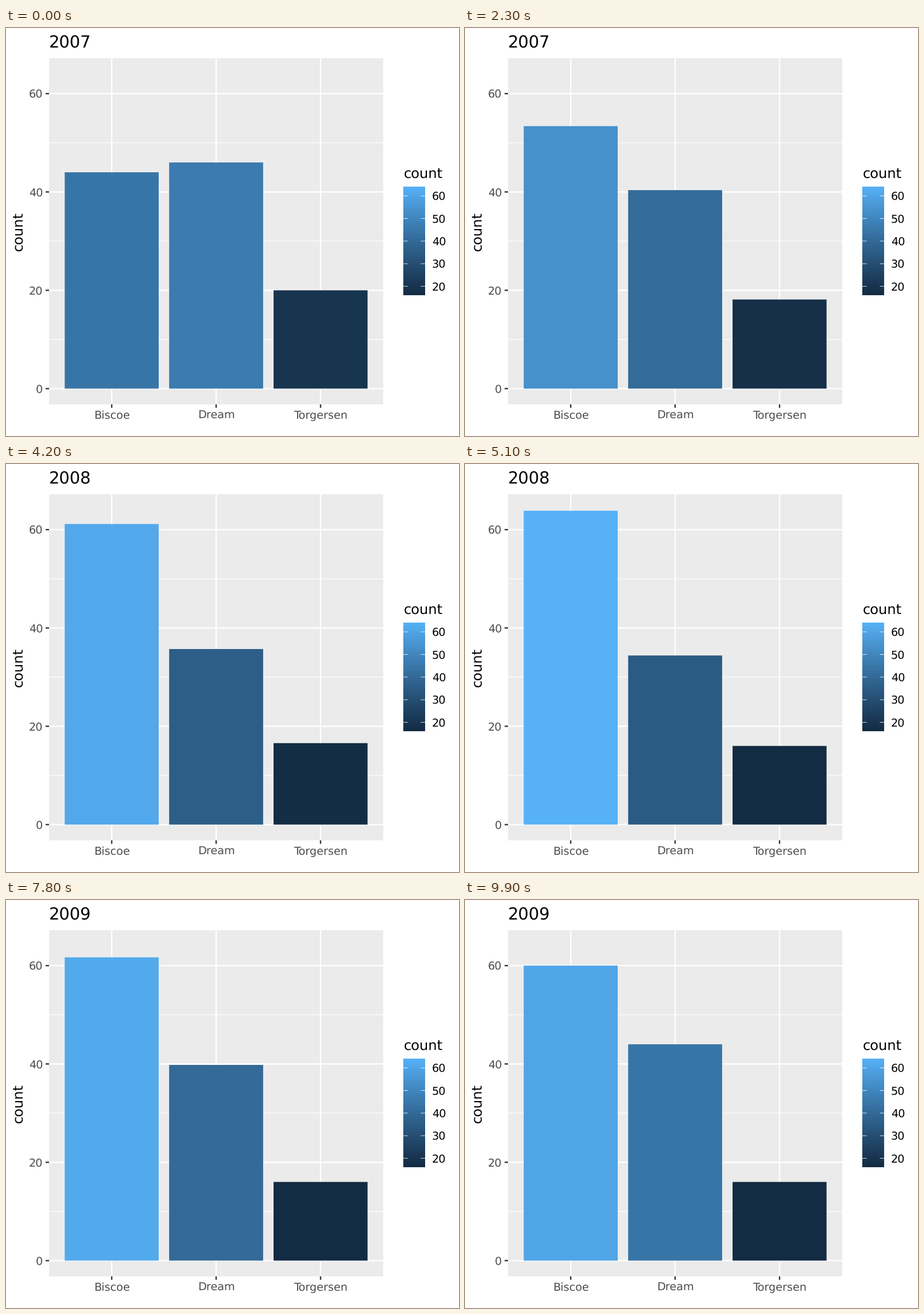
Animation of 789x710 px, one loop 10000 ms. Source, as a matplotlib script:

```python
import numpy as np
import matplotlib.pyplot as plt
from matplotlib.animation import FuncAnimation
from matplotlib.patches import Rectangle

W, H, DPI = 789, 710, 64
PT = 72 / DPI  # points per pixel
FRAMES, INTERVAL = 100, 100

plt.rcParams.update({
    "font.family": "DejaVu Sans",
    "text.hinting": "no_hinting",
    "path.snap": False,
})

ISLANDS = ["Biscoe", "Dream", "Torgersen"]
YEARS = [2007, 2008, 2009]
COUNTS = np.array([[44, 46, 20], [64, 34, 16], [60, 44, 16]])
KEYS = [0, 49, 99]  # animation steps at which each year is reached
LOW, HIGH = 16, 64

# Panel geometry in pixels
LEFT, RIGHT, TOP, BOTTOM = 75.0, 657.0, 52.6, 654.9
X_UNIT = (RIGHT - LEFT) / 3.2
Y_UNIT = (BOTTOM - TOP) / 70.4
ZERO = BOTTOM - 3.2 * Y_UNIT
BAR_W = 0.9 * X_UNIT
MAJOR, MINOR, TICK = 2.33, 1.17, 6.0
SMALL, MEDIUM, LARGE = 19.25, 24.1, 28.9

# Colour bar geometry
BAR_L, BAR_R, BAR_T, BAR_B = 692.2, 730.0, 276.3, 465.3

TO_XYZ = np.array([[0.4124564, 0.3575761, 0.1804375],
                   [0.2126729, 0.7151522, 0.0721750],
                   [0.0193339, 0.1191920, 0.9503041]])
WHITE = TO_XYZ.sum(axis=1)


def rgb_to_lab(rgb):
    rgb = np.asarray(rgb) / 255
    lin = np.where(rgb > 0.04045, ((rgb + 0.055) / 1.055) ** 2.4, rgb / 12.92)
    t = TO_XYZ @ lin / WHITE
    x, y, z = np.where(t > 216 / 24389, np.cbrt(t), (24389 / 27 * t + 16) / 116)
    return np.array([116 * y - 16, 500 * (x - y), 200 * (y - z)])


def lab_to_rgb(lab):
    y = (lab[0] + 16) / 116
    f = np.array([y + lab[1] / 500, y, y - lab[2] / 200])
    t = np.where(f > 6 / 29, f ** 3, (116 * f - 16) * 27 / 24389)
    lin = np.linalg.solve(TO_XYZ, t * WHITE)
    rgb = np.where(lin > 0.0031308,
                   1.055 * np.maximum(lin, 0) ** (1 / 2.4) - 0.055, 12.92 * lin)
    return np.clip(rgb, 0, 1)


DARK = rgb_to_lab([0x13, 0x2B, 0x43])
LIGHT = rgb_to_lab([0x56, 0xB1, 0xF7])


def fill(count):
    p = (count - LOW) / (HIGH - LOW)
    return lab_to_rgb(DARK + p * (LIGHT - DARK))


def x_px(i):
    return LEFT + (0.6 + i) * X_UNIT


def y_px(v):
    return ZERO - v * Y_UNIT


fig = plt.figure(figsize=(W / DPI, H / DPI), dpi=DPI, facecolor="white")
ax = fig.add_axes([0, 0, 1, 1])
ax.axis("off")


def line(xs, ys, width, color="white", z=2):
    ax.plot(xs, ys, color=color, lw=width * PT, solid_capstyle="butt", zorder=z)


def label(x, y, text, size, color="black", ha="left", **kw):
    return ax.text(x, y, text, fontsize=size * PT, color=color, ha=ha,
                   va="baseline", **kw)


def draw_panel():
    ax.add_patch(Rectangle((LEFT, TOP), RIGHT - LEFT, BOTTOM - TOP,
                           fc="#EBEBEB", lw=0, zorder=1))
    for v in (10, 30, 50):
        line([LEFT, RIGHT], [y_px(v)] * 2, MINOR)
    for v in (0, 20, 40, 60):
        y = y_px(v)
        line([LEFT, RIGHT], [y, y], MAJOR)
        line([LEFT - TICK, LEFT], [y, y], MAJOR, "#333333")
        label(64.2, y + 7, str(v), SMALL, "#4D4D4D", "right")
    for i, name in enumerate(ISLANDS):
        x = x_px(i)
        line([x, x], [TOP, BOTTOM], MAJOR)
        line([x, x], [BOTTOM, BOTTOM + TICK], MAJOR, "#333333")
        label(x, 680, name, SMALL, "#4D4D4D", "center")
    ax.text(29.8, (TOP + BOTTOM) / 2, "count", fontsize=MEDIUM * PT, rotation=90,
            rotation_mode="anchor", ha="center", va="baseline")


def draw_legend():
    label(BAR_L, 262, "count", MEDIUM)
    ramp = np.array([[fill(v)] for v in np.linspace(HIGH, LOW, 300)])
    ax.imshow(ramp, extent=(BAR_L, BAR_R, BAR_B, BAR_T), aspect="auto",
              interpolation="bilinear", zorder=2)
    tick = (BAR_R - BAR_L) / 5
    for v in range(20, 61, 10):
        y = BAR_B - (v - LOW) / (HIGH - LOW) * (BAR_B - BAR_T)
        line([BAR_L, BAR_L + tick], [y, y], 0.82, z=3)
        line([BAR_R - tick, BAR_R], [y, y], 0.82, z=3)
        label(742, y + 7, str(v), SMALL)


draw_panel()
draw_legend()
title = label(LEFT, 33.3, "", LARGE)
bars = [ax.add_patch(Rectangle((x_px(i) - BAR_W / 2, ZERO), BAR_W, 0, lw=0, zorder=4))
        for i in range(len(ISLANDS))]
ax.set_xlim(0, W)
ax.set_ylim(H, 0)


def update(step):
    year = YEARS[0] + (YEARS[-1] - YEARS[0]) * step / (FRAMES - 1)
    title.set_text(str(round(year)))
    for bar, series in zip(bars, COUNTS.T):
        count = np.interp(step, KEYS, series)
        bar.set_height(-count * Y_UNIT)
        bar.set_facecolor(fill(count))
    return [title, *bars]


anim = FuncAnimation(fig, update, frames=FRAMES, interval=INTERVAL,
                     repeat=True, repeat_delay=0, blit=False)
plt.show()
```
